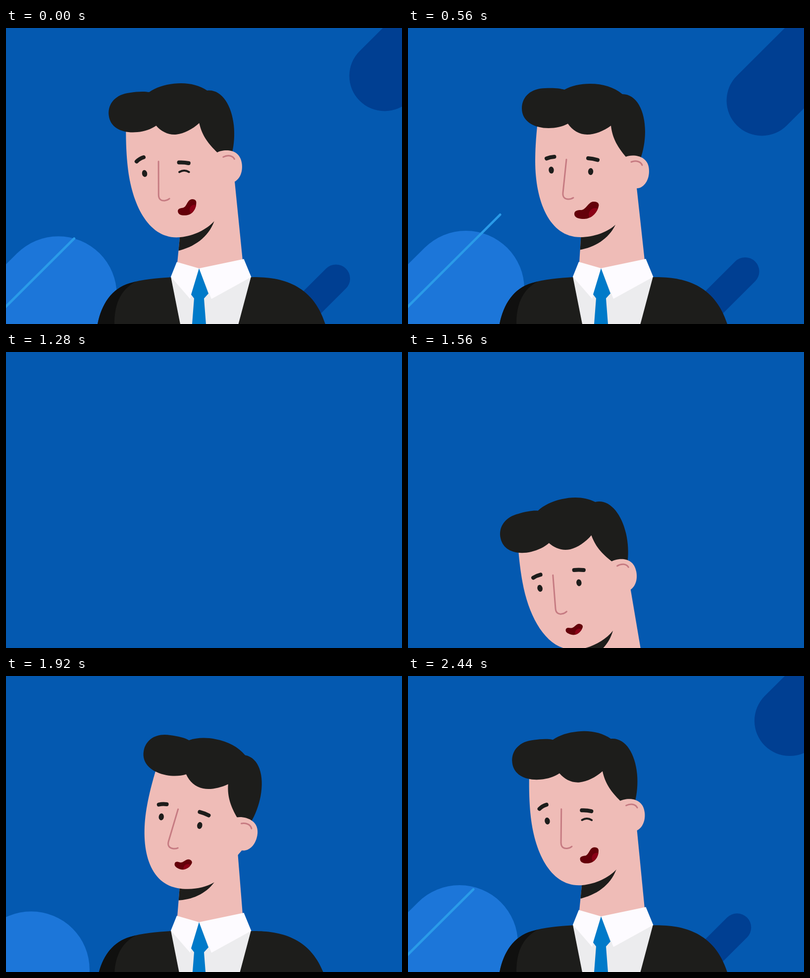
Write an HTML page with a canvas that moves like this. It is 800 px wide and 600 px high and loops after 2480 ms.

```html
<!DOCTYPE html>
<html lang="en">
<head>
<meta charset="utf-8">
<title>Winking man</title>
<style>
  html, body { margin: 0; width: 100%; height: 100%; overflow: hidden; background: #0459b0; }
  canvas { display: block; }
</style>
</head>
<body>
<canvas id="stage" width="800" height="600"></canvas>
<script>
const ctx = document.getElementById('stage').getContext('2d');
const LOOP = 2480, STEP = 40, ENTRY_OFFSET = 1200, ENTRY = 120;
const RAD = Math.PI / 180;
const PIVOT = [350, 382];

const color = {
  back: '#0459b0', dark: '#003f92', light: '#1c76d9', line: '#2a9be8',
  ink: '#1d1d1b', shade: '#10100f', skin: '#efbcb7', crease: '#c67b82',
  shirt: '#ececee', collar: '#fdfbff', tie: '#007ac9',
  mouth: '#640009', tongue: '#8a0016'
};

const shapes = {
  face: new Path2D('M262 190C258 225 257 250 257 270C257 350 285 424 348 424C375 424 402 414 419 399L462 325L465 255L400 180Z'),
  hair: new Path2D('M230 163C230 138 250 122 277 122C292 121 307 122 316 125C330 117 348 113 368 113C394 113 416 120 433 134C462 134 479 168 479 210C479 230 475 250 470 264L440 261C425 243 413 225 410 198C395 209 377 216 362 216C346 216 332 207 323 194C312 200 298 203 284 203C256 203 230 190 230 163Z'),
  ear: new Path2D('M440 261C452 256 487 256 487 290C487 312 474 325 462 325L445 310Z'),
  earFold: new Path2D('M451 271.5C460 268 470 270 473 278'),
  nose: new Path2D('M320 266.5L313 334C312 344 318 347 324 347C328 347 331 346 334 344'),
  shadow: new Path2D('M325 452C365 451 402 434 419 399L400 380L325 400Z'),
  mouth: new Path2D('M-25.8 -2.9C-23.2 -9.4 -16.3 -7.7 -9.8 -5C-.2 -2.2 9.2 -14.6 18.8 -11.8C28.4 -9 29 -2.3 25.2 1.6C17.6 12.5 2 19.1 -11 13.9C-22.1 9.4 -28.4 3.6 -25.8 -2.9Z'),
  suit: new Path2D('M185 600C193 560 213 528 250 517C275 509 305 507 333 505L495 505C550 504 618 515 645 600Z'),
  sleeve: new Path2D('M185 600C193 560 213 528 250 517L262 514C228 532 219 565 219 600Z')
};

// Each key: time, then values.
const headKeys = [   // angle, x, y, extra hair angle
  [200, -12, -8, 0, -3], [660, 10.7, 6, -5, 0], [1260, -6.5, 0, 0, 0], [1680, 0, 0, 0, 0]
];
const mouthKeys = [  // x, y, angle, width, height
  [200, 342, 382.5, 0, .66, .72], [660, 350.5, 373.8, -14, .66, .72],
  [1160, 368, 366, -25, .8, .9], [1260, 368, 366, -25, .8, .9], [1680, 361, 370, -22, 1, 1]
];
const winkKeys = [[700, 0], [1160, 1], [1260, 1], [1680, 0]];
const eyeKeys = [[880, 1], [980, 0], [1400, 0], [1600, 1]];

const mix = (a, b, p) => a + (b - a) * p;

function track(keys, t) {
  const next = keys.findIndex(k => k[0] > t);
  if (next < 0) return keys[keys.length - 1].slice(1);
  if (next === 0) return keys[0].slice(1);
  const a = keys[next - 1], b = keys[next];
  const p = (1 - Math.cos(Math.PI * (t - a[0]) / (b[0] - a[0]))) / 2;
  return a.slice(1).map((v, i) => mix(v, b[i + 1], p));
}

const settle = (t, rate, end, power) => Math.pow(rate * Math.max(0, end - t), power);

function fill(shape, paint) {
  ctx.fillStyle = paint;
  ctx.fill(shape);
}

function stroke(shape, width, paint) {
  ctx.strokeStyle = paint;
  ctx.lineWidth = width;
  ctx.lineCap = 'round';
  ctx.lineJoin = 'round';
  ctx.stroke(shape);
}

function polygon(...points) {
  const path = new Path2D();
  points.forEach(([x, y]) => path.lineTo(x, y));
  path.closePath();
  return path;
}

function segment(x1, y1, x2, y2) {
  const path = new Path2D();
  path.moveTo(x1, y1);
  path.lineTo(x2, y2);
  return path;
}

function oval(x, y, rx, ry, angle = 0) {
  const path = new Path2D();
  path.ellipse(x, y, rx, ry, angle, 0, Math.PI * 2);
  return path;
}

function rotateAbout(x, y, degrees) {
  ctx.translate(x, y);
  ctx.rotate(degrees * RAD);
  ctx.translate(-x, -y);
}

// A diagonal bar with a round end; side is 1 to run up right, -1 to run down left.
function bar(x, y, radius, side, paint) {
  stroke(segment(x, y, x + side * 900, y - side * 900), radius * 2, paint);
}

function drawBackdrop(t) {
  const early = Math.pow(Math.max(0, 950 - t) / 310, 2);
  const far = settle(t, .0107, 1870, 2);
  const near = far * .29 + 60 * early;
  const left = settle(t, .006, 1760, 2) + 21 * early;
  const tip = settle(t, .00305, 2475, 3) + 60 * early;
  bar(713.5 + far, 148.5 - far, 71.3, 1, color.dark);
  bar(681.5 - near, 493 + near, 28.5, -1, color.dark);
  bar(117 - left, 529 + left, 118, -1, color.light);
  bar(196.5 - tip, 368 + tip, 2.4, -1, color.line);
}

function drawNeck(head, drop) {
  const [angle, dx, dy] = head;
  const c = Math.cos(angle * RAD), s = Math.sin(angle * RAD);
  const onHead = (x, y) => {
    const rx = x - PIVOT[0], ry = y - PIVOT[1];
    return [PIVOT[0] + dx + rx * c - ry * s, PIVOT[1] + dy + drop + rx * s + ry * c];
  };
  const nape = onHead(468.4, 382);
  const base = [478, 470 + drop];
  const top = nape.map((v, i) => v + (v - base[i]) * .75);
  const neck = polygon(top, nape, base, [390, 492 + drop], [346, 476 + drop], onHead(350.5, 405));
  fill(neck, color.skin);
  ctx.save();
  ctx.clip(neck);
  placeHead(head, drop);
  fill(shapes.shadow, color.ink);
  ctx.restore();
}

function placeHead([angle, dx, dy], drop) {
  ctx.translate(dx, dy + drop);
  rotateAbout(...PIVOT, angle);
}

function drawEyes(t) {
  const [wink] = track(winkKeys, t);
  const [open] = track(eyeKeys, t);
  fill(oval(289.5, 288, 5.2, 7, -.08), color.ink);
  if (open > .2) {
    fill(oval(369, 291, mix(7, 5.2, open), 7 * open, .05), color.ink);
  } else {
    const lid = new Path2D('M359.5 292.5Q370 287.5 379 294.5');
    stroke(lid, 4, color.ink);
  }
  const brow = (x1, y1, cx, cy, x2, y2) => {
    const path = new Path2D();
    path.moveTo(x1, y1);
    path.quadraticCurveTo(cx, cy, x2, y2);
    stroke(path, 8, color.ink);
  };
  brow(mix(280, 276, wink), mix(264.5, 262, wink), mix(287, 283, wink), mix(261.5, 256.5, wink),
       mix(295.5, 291, wink), mix(261, 255, wink));
  brow(mix(364, 361, wink), mix(264, 273, wink), mix(373, 371, wink), mix(264.5, 273.5, wink),
       mix(383, 380, wink), mix(267.5, 276.5, wink));
}

function drawMouth(t) {
  const [x, y, angle, width, height] = track(mouthKeys, t);
  ctx.save();
  ctx.translate(x, y);
  ctx.rotate(angle * RAD);
  ctx.scale(width, height);
  fill(shapes.mouth, color.mouth);
  ctx.clip(shapes.mouth);
  fill(oval(13, 14, 13, 13), color.tongue);
  ctx.restore();
}

function drawHead(head, drop, t) {
  ctx.save();
  placeHead(head, drop);
  fill(shapes.face, color.skin);
  ctx.save();
  rotateAbout(470, 180, head[3]);
  fill(shapes.hair, color.ink);
  ctx.restore();
  fill(shapes.ear, color.skin);
  stroke(shapes.earFold, 3, color.crease);
  stroke(shapes.nose, 3, color.crease);
  drawEyes(t);
  drawMouth(t);
  ctx.restore();
}

function drawBody(drop) {
  ctx.save();
  ctx.translate(0, drop);
  fill(shapes.suit, color.ink);
  fill(shapes.sleeve, color.shade);
  fill(polygon([333, 504], [390, 487], [495, 504], [469.5, 600], [352, 600]), color.shirt);
  fill(polygon([345, 474], [390, 487], [372, 549], [333, 504]), color.collar);
  fill(polygon([390, 487], [480.5, 468], [495.5, 504.5], [415, 549]), color.collar);
  fill(polygon([390, 487], [409, 538], [400, 548], [404, 600], [376, 600], [380, 548], [374, 540]), color.tie);
  ctx.restore();
}

function draw(ms) {
  const t = (Math.floor(ms / STEP) * STEP + ENTRY_OFFSET) % LOOP;
  ctx.fillStyle = color.back;
  ctx.fillRect(0, 0, 800, 600);
  if (t < ENTRY) return;
  const drop = 596 * Math.exp((ENTRY - t) / 133);
  const head = track(headKeys, t);
  drawBackdrop(t);
  drawNeck(head, drop);
  drawHead(head, drop, t);
  drawBody(drop);
}

const start = performance.now();
function tick() {
  draw(performance.now() - start);
  requestAnimationFrame(tick);
}
tick();
</script>
</body>
</html>
```
